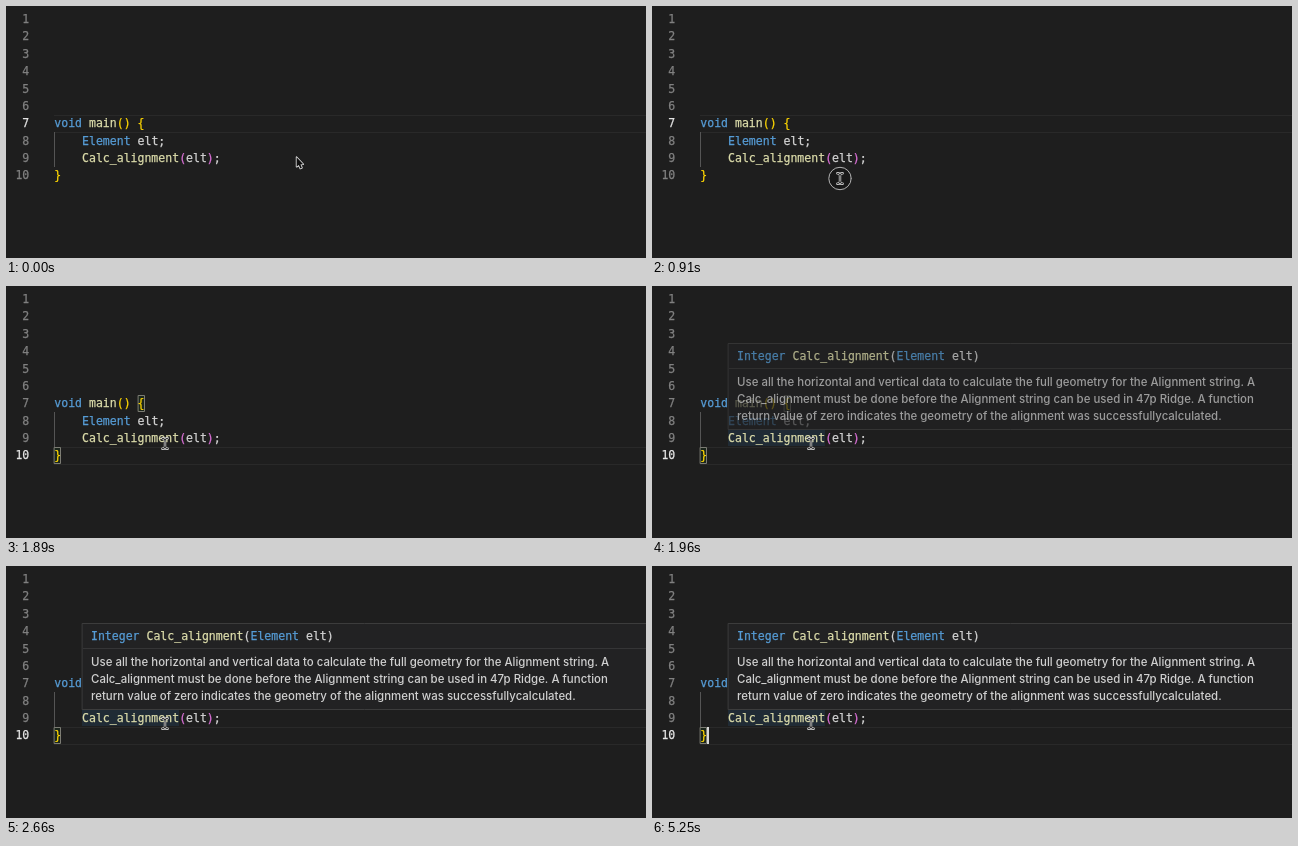
Write an HTML page with a canvas that moves like this. It is 640 px wide and 252 px high and loops after 5.53 s.

```html
<!DOCTYPE html>
<html lang="en">
<head>
<meta charset="utf-8">
<title>Hover help in a code editor</title>
<style>
html, body { margin: 0; width: 100%; height: 100%; overflow: hidden; background: #1e1e1e; }
canvas { display: block; width: 640px; height: 252px; }
</style>
</head>
<body>
<canvas id="stage" width="640" height="252"></canvas>
<script>
const ctx = document.getElementById('stage').getContext('2d', { alpha: false });
const LOOP = 5530, STEP = 70;
const PITCH = 17.38, COL = 6.935, LEFT = 48.3;
const MONO = '11.52px "DejaVu Sans Mono", monospace';
const SANS = '500 11.44px Inter, sans-serif';
const BLUE = '#569cd6', CREAM = '#dcdcaa', GOLD = '#ffd700', PINK = '#da70d6', TEXT = '#d4d4d4';

const code = {
  7: [['void', BLUE], [' main', CREAM], ['()', GOLD], [' {', GOLD]],
  8: [['    Element', BLUE], [' elt;', TEXT]],
  9: [['    Calc_alignment', CREAM], ['(', PINK], ['elt', TEXT], [')', PINK], [';', TEXT]],
  10: [['}', GOLD]]
};
const signature = [['Integer', BLUE], [' Calc_alignment', CREAM], ['(', TEXT],
  ['Element', BLUE], [' elt)', TEXT]];
const help = [
  'Use all the horizontal and vertical data to calculate the full geometry for the Alignment string. A',
  'Calc_alignment must be done before the Alignment string can be used in 47p Ridge. A function',
  'return value of zero indicates the geometry of the alignment was successfullycalculated.'
];

// time, x, y
const path = [[210, 290, 155], [770, 188, 172.5], [910, 188, 172.5], [1050, 198, 168.5],
  [1190, 198, 168.5], [1750, 159, 157.5]];

const baseline = n => 17 + (n - 1) * PITCH;
const lineTop = n => Math.round(4.4 + (n - 1) * PITCH);
const ease = p => p * p * (3 - 2 * p);

function rect(x, y, w, h, color) {
  ctx.fillStyle = color;
  ctx.fillRect(x, y, w, h);
}

// Monospace text, slightly emboldened.
function mono(text, x, y, color, align = 'left') {
  ctx.font = MONO;
  ctx.textAlign = align;
  ctx.fillStyle = ctx.strokeStyle = color;
  ctx.lineWidth = .25;
  ctx.fillText(text, x, y);
  ctx.strokeText(text, x, y);
}

function spans(parts, x, y) {
  let col = 0;
  for (const [text, color] of parts) {
    mono(text, x + col * COL, y, color);
    col += text.length;
  }
}

function pointerAt(t) {
  if (t <= path[0][0]) return path[0].slice(1);
  for (let i = 1; i < path.length; i++) {
    const [t0, x0, y0] = path[i - 1], [t1, x1, y1] = path[i];
    if (t <= t1) {
      const p = ease((t - t0) / (t1 - t0));
      return [x0 + (x1 - x0) * p, y0 + (y1 - y0) * p];
    }
  }
  return path[path.length - 1].slice(1);
}

function bracketBox(x, n) {
  const y = lineTop(n);
  rect(x, y, 7, 17, 'rgba(0,100,0,.1)');
  ctx.strokeStyle = '#7c7c74';
  ctx.lineWidth = 1;
  ctx.strokeRect(x + .5, y + .5, 6, 16);
}

function editor(t) {
  const active = t < 980 ? 7 : 10;
  rect(0, 0, 640, 252, '#1e1e1e');
  rect(48, lineTop(active), 592, 1, '#292929');
  rect(48, lineTop(active) + 17, 592, 1, '#292929');
  rect(48, lineTop(8), 1, 35, '#555');
  if (t >= 1960) rect(76, lineTop(9), 97, 17, 'rgba(38,79,120,.25)');
  if (active === 10) {
    bracketBox(132, 7);
    bracketBox(48, 10);
  }
  for (let n = 1; n <= 10; n++) {
    mono(n, 23.3, baseline(n), n === active ? '#e4e4e4' : '#808080', 'right');
  }
  for (const n in code) spans(code[n], LEFT, baseline(+n));
  if (t >= 980 && (t - 980) % 1050 < 490) rect(55, lineTop(10), 2, 17, '#d8d8d8');
}

function popup(alpha) {
  if (alpha <= 0) return;
  ctx.globalAlpha = alpha;
  rect(76, 57, 570, 87, '#222223');
  ctx.strokeStyle = '#3c3c3c';
  ctx.lineWidth = 1;
  ctx.strokeRect(76.5, 57.5, 570, 86);
  rect(77, 82, 563, 1, '#353536');
  spans(signature, 85, 74.2);
  ctx.font = SANS;
  ctx.fillStyle = '#d0d0d0';
  help.forEach((line, i) => ctx.fillText(line, 85, 100 + i * 17.2));
  ctx.globalAlpha = 1;
}

function outline(draw, color, width) {
  ctx.beginPath();
  draw();
  ctx.lineJoin = ctx.lineCap = 'round';
  ctx.strokeStyle = color;
  ctx.lineWidth = width;
  ctx.stroke();
}

function arrow(x, y) {
  const shape = [[0, 0], [0, 9.6], [2.2, 7.7], [3.7, 11.2], [5.3, 10.5], [3.8, 7.2], [6.6, 7]];
  outline(() => {
    shape.forEach(([dx, dy]) => ctx.lineTo(x + dx, y + dy));
    ctx.closePath();
  }, '#e8e8e8', 1.6);
  ctx.fillStyle = '#111';
  ctx.fill();
}

function beam(x, y) {
  outline(() => {
    for (const s of [-1, 1]) {
      ctx.moveTo(x - 2.6, y + s * 5.2);
      ctx.quadraticCurveTo(x, y + s * 5.2, x, y + s * 3.2);
      ctx.quadraticCurveTo(x, y + s * 5.2, x + 2.6, y + s * 5.2);
    }
    ctx.moveTo(x, y - 3.2);
    ctx.lineTo(x, y + 3.2);
  }, '#d8d8d8', 2.4);
  ctx.strokeStyle = '#1a1a1a';
  ctx.lineWidth = .9;
  ctx.stroke();
}

function clickRing(x, y) {
  ctx.beginPath();
  ctx.arc(x, y, 11.2, 0, Math.PI * 2);
  ctx.fillStyle = 'rgba(20,20,20,.6)';
  ctx.fill();
  ctx.strokeStyle = '#b4b4b4';
  ctx.lineWidth = 1;
  ctx.stroke();
}

function pointer(t) {
  const [x, y] = pointerAt(t);
  if (t < 280) return arrow(x + .6, y - 3.8);
  if (t >= 770 && t < 1260) clickRing(x, y);
  beam(x, y);
}

function frame(now) {
  const t = Math.floor(now % LOOP / STEP) * STEP;
  editor(t);
  popup(Math.min(1, (t - 1890) / 100));
  pointer(t);
}

let start;
function tick(now) {
  start ??= now;
  frame(now - start);
  requestAnimationFrame(tick);
}
frame(0);
requestAnimationFrame(tick);
</script>
</body>
</html>
```
